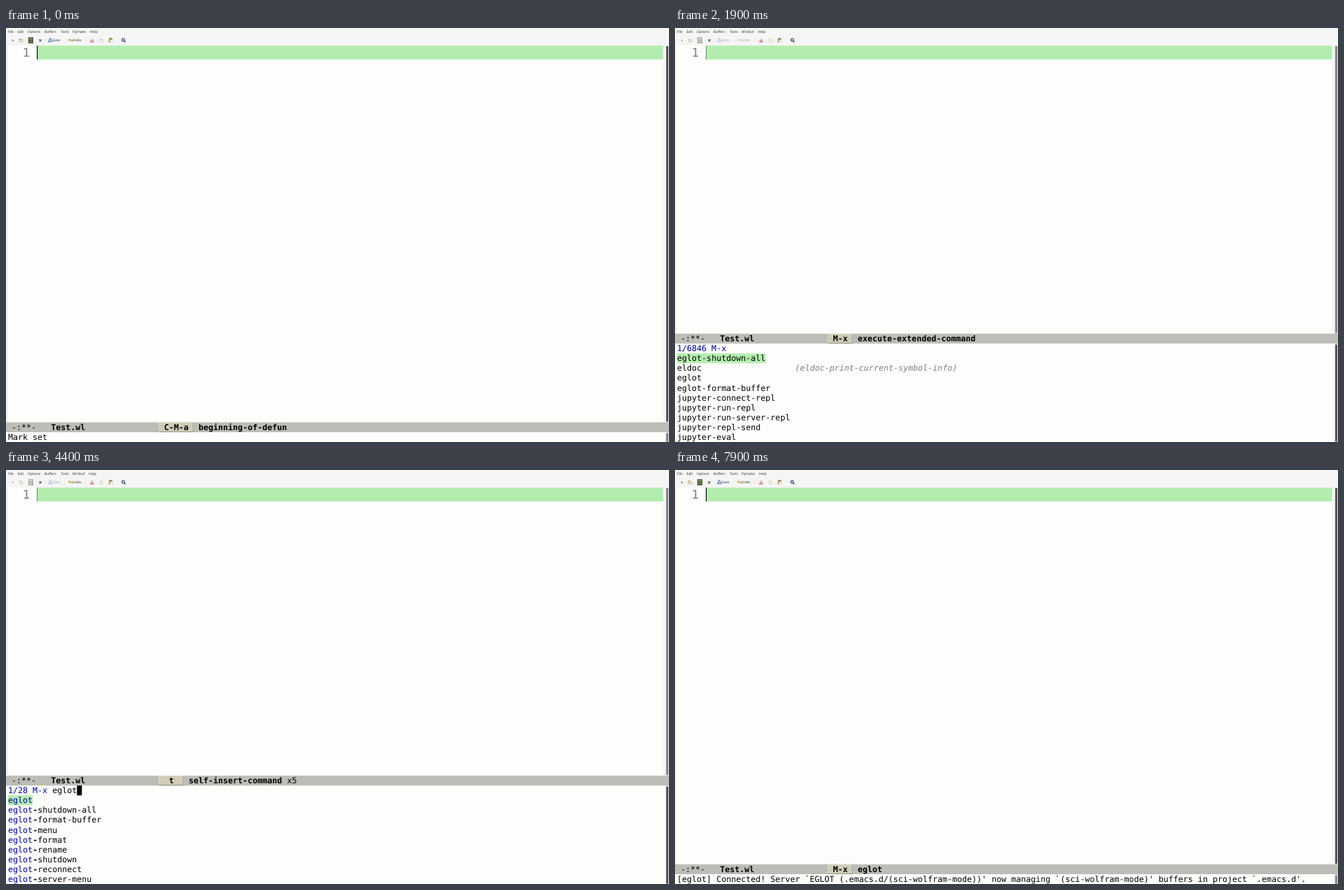
Animation, 947 px wide and 592 px high, one loop 8000 ms. Source, as an HTML page with a canvas:

```html
<!DOCTYPE html>
<html lang="en">
<head>
<meta charset="utf-8">
<title>Editor session</title>
<style>
html, body { margin: 0; width: 100%; height: 100%; overflow: hidden; background: #fdfdfc; }
canvas { display: block; width: 947px; height: 592px; }
</style>
</head>
<body>
<canvas id="stage" width="947" height="592"></canvas>
<script>
const ctx = document.getElementById('stage').getContext('2d');
const W = 947, H = 592, LOOP = 8000;
const SIZE = 11.67, CW = 7.025, ROW = 14.08, LEFT = 3;
const MONO = '"DejaVu Sans Mono", monospace';
const SANS = '"Noto Sans", "Open Sans", sans-serif';
const BLUE = '#0000a8', GREEN = '#b3edae', PAPER = '#fdfdfc', CHROME = '#f6f5f6';

// Moments in ms
const PROMPT = 900, LIST = 1800, CARET = 2000, DONE = 4600, CONNECTED = 7500;
const KEYS = [[2500, 'e'], [2800, 'g'], [3100, 'l'], [3300, 'o'], [3600, 't']];

const START = ['eglot-shutdown-all', 'eldoc', 'eglot', 'eglot-format-buffer',
  'jupyter-connect-repl', 'jupyter-run-repl', 'jupyter-run-server-repl',
  'jupyter-repl-send', 'jupyter-eval'];
const WITH_E = ['eglot-shutdown-all', 'eldoc', 'eglot', 'eglot-format-buffer',
  'ert', 'ediff', 'eshell', 'elint-file', 'eww'];
const EGLOT = ['eglot-shutdown-all', 'eglot', 'eglot-format-buffer', 'eglot-menu',
  'eglot-format', 'eglot-rename', 'eglot-shutdown', 'eglot-reconnect', 'eglot-server-menu'];
const EXACT = ['eglot', ...EGLOT.filter(name => name !== 'eglot')];

const SERVER = "`EGLOT (.emacs.d/(sci-wolfram-mode))'";
const WAITING = '[eglot] Waiting in background for server ' + SERVER;
const READY = '[eglot] Connected! Server ' + SERVER +
  " now managing `(sci-wolfram-mode)' buffers in project `.emacs.d'.";

function rect(x, y, w, h, color) {
  ctx.fillStyle = color;
  ctx.fillRect(x, y, w, h);
}

function line(points, color, width = 1) {
  ctx.strokeStyle = color;
  ctx.lineWidth = width;
  ctx.beginPath();
  points.forEach(([x, y]) => ctx.lineTo(x, y));
  ctx.stroke();
}

function ring(x, y, r, color, width = 0.9) {
  ctx.strokeStyle = color;
  ctx.lineWidth = width;
  ctx.beginPath();
  ctx.arc(x, y, r, 0, Math.PI * 2);
  ctx.stroke();
}

function text(str, x, y, color = '#000', style = '', size = SIZE, family = MONO) {
  ctx.font = `${style} ${size}px ${family}`;
  ctx.fillStyle = color;
  ctx.fillText(str, x, y);
}

const label = (str, x, y, color = '#333') => text(str, x, y, color, '', 4.9, SANS);

function mix(a, b, k) {
  const v = Math.round(a + (b - a) * Math.min(1, Math.max(0, k)));
  return `rgb(${v},${v},${v + 4})`;
}

function drawMenu(inPrompt) {
  rect(0, 0, W, 25, CHROME);
  const items = [['File', 3], ['Edit', 16.5], ['Options', 31], ['Buffers', 55], ['Tools', 78]];
  items.push(...(inPrompt ? [['Minibuf', 95], ['Help', 118.3]] : [['Flymake', 95], ['Help', 120]]));
  items.forEach(([name, x]) => label(name, x, 6.8));
}

function drawTools(off, undoOff) {
  // New file and open folder
  ctx.globalAlpha = off ? 0.45 : 1;
  rect(7, 15, 5, 5.5, '#fbfbfb');
  rect(8.2, 17, 3, 1.6, '#8d9a8d');
  rect(9, 16.2, 1.3, 3.2, '#8d9a8d');
  rect(18.5, 15, 3, 1.5, '#b9aa8c');
  rect(18.5, 16, 6, 4.5, '#cbbd9f');
  rect(19.3, 17.2, 5, 2.4, '#e8dfcd');
  ctx.globalAlpha = 1;

  // Cabinet
  rect(31.8, 13.2, 7.2, 8.8, off ? '#a5a5a2' : '#45502f');
  rect(32.8, 14.2, 5.2, 2.8, off ? '#cfcfcb' : '#748a52');
  rect(32.8, 18, 5.2, 3, off ? '#c4c4c0' : '#67794a');

  line([[47.4, 16], [50.6, 19.5]], '#4a4a4a', 1.1);
  line([[50.6, 16], [47.4, 19.5]], '#4a4a4a', 1.1);

  // Save
  ctx.globalAlpha = off ? 0.4 : 1;
  line([[61, 18], [63.3, 14.7], [65.5, 18]], '#3f75b8', 1.1);
  rect(60, 18.4, 6.6, 1.8, '#6a8db8');
  label('Save', 66.6, 19.4);

  // Undo
  ctx.globalAlpha = undoOff ? 0.4 : 1;
  line([[91.3, 15.2], [89.3, 17.1], [91.3, 19]], '#c99a1c', 1);
  line([[89.5, 17.1], [93.6, 17.1], [94.4, 19.6]], '#c99a1c', 1.2);
  label('Undo', 94.8, 19.4);
  ctx.globalAlpha = 1;

  [56.5, 84.5, 113].forEach(x => rect(x, 13.5, 0.5, 8, '#e6e4e2'));

  // Cut
  line([[121.3, 14.8], [124, 18.8]], '#aaa', 0.8);
  line([[124.7, 14.8], [122, 18.8]], '#aaa', 0.8);
  ring(121.6, 19.4, 1.1, '#c8504c');
  ring(124.4, 19.4, 1.1, '#c8504c');

  // Copy and paste
  rect(133.6, 14.8, 4, 4.6, '#e5e0d4');
  rect(135, 16.2, 4, 4.6, '#ddd8c8');
  rect(135.6, 16.8, 2.8, 3.4, '#f3f0e8');
  rect(146.8, 14.8, 5.4, 6, '#b08f4e');
  rect(148.2, 14.2, 2.6, 1.4, '#77705f');
  rect(148.4, 16.6, 4.2, 4.4, '#ece9df');

  // Search
  ring(167.4, 17, 1.9, '#36466f', 1.2);
  line([[168.8, 18.4], [170.7, 20.3]], '#36466f', 1.4);
}

function drawWindow(bottom, inPrompt, barColor) {
  rect(0, 25, W, bottom - 25, PAPER);
  rect(0, 25, 2.7, bottom - 25, '#f2f2f1');
  rect(938.7, 25, 3, bottom - 25, '#f5f5f5');
  rect(941.7, 25, W - 941.7, bottom - 25, '#e6e4ea');
  rect(943, 26, 3, bottom - 27, barColor);
  rect(44.2, 25.2, 894.5, 19.8, GREEN);
  text('1', 23.7, 41, '#7b7b7b', '', 17.1);
  rect(44, 25.2, inPrompt ? 0.7 : 1.1, 19.8, inPrompt ? '#555' : '#000');
}

function drawModeLine(top, key, command, count) {
  const base = top + 11, col = n => 1 + n * CW;
  rect(0, top, W, ROW, '#bcbdb6');
  rect(0, top, W, 0.6, '#c9cac4');
  text('-:**-', col(1), base);
  text('Test.wl', col(9), base, '#000', 'bold');

  const cells = Math.max(5, key.length + 2);
  const x = col(31) - 0.5, w = cells * CW;
  rect(x, top, w, ROW, '#cfccb7');
  rect(x, top, w, 0.7, '#e2dfcc');
  rect(x, top, 0.7, ROW, '#e2dfcc');
  rect(x, top + ROW - 0.9, w, 0.9, '#8f8d7e');
  rect(x + w - 0.7, top, 0.7, ROW, '#a09e8e');
  text(key, col(31 + (cells - key.length) / 2), base, '#000', 'bold');
  text(command, col(32 + cells), base, '#000', 'bold');
  if (count > 1) text('x' + count, col(33 + cells + command.length), base);
}

function drawCandidate(name, typed, top, selected) {
  const base = top + 11, n = typed.length;
  if (selected) rect(LEFT, top, name.length * CW, ROW, GREEN);
  text(name.slice(0, n), LEFT, base, BLUE);
  text(name.slice(n, n + 1), LEFT + n * CW, base, '#000', n ? 'bold' : '');
  text(name.slice(n + 1), LEFT + (n + 1) * CW, base);
  if (name === 'eldoc') {
    text('(eldoc-print-current-symbol-info)', LEFT + 24 * CW, base, '#7f7f7f', 'italic');
  }
}

function drawList(top, typed, showCaret) {
  const n = typed.length;
  const total = n === 0 ? 6846 : n === 1 ? 312 : 28;
  const names = [START, WITH_E, EGLOT, EGLOT, EGLOT, EXACT][n];
  const prompt = `1/${total} M-x `;
  text(prompt, LEFT, top + 11, BLUE);
  text(typed, LEFT + prompt.length * CW, top + 11);
  if (showCaret) rect(LEFT + (prompt.length + n) * CW, top, CW, ROW, '#000');
  names.forEach((name, i) => drawCandidate(name, typed, top + (i + 1) * ROW, i === 0));
}

function draw(t) {
  const inPrompt = t >= PROMPT && t < DONE;
  const listing = t >= LIST && t < DONE;
  const typed = KEYS.filter(([at]) => t >= at).map(([, key]) => key).join('');
  const echoTop = H - ROW * (listing ? 10 : 1);
  const modeTop = echoTop - ROW;

  // Scroll bars swap emphasis when the focus moves
  const fade = t < DONE ? (t - LIST + 50) / 100 : 1 - (t - DONE) / 350;

  drawMenu(inPrompt);
  drawTools(listing, listing && !typed);
  drawWindow(modeTop, inPrompt, mix(84, 132, fade));

  rect(0, echoTop, W, H - echoTop, PAPER);
  rect(941.7, echoTop, W - 941.7, H - echoTop, '#e6e4ea');
  rect(943, echoTop + 1.5, 3, H - echoTop - 2, mix(132, 84, fade));

  if (t < LIST) drawModeLine(modeTop, 'C-M-a', 'beginning-of-defun');
  else if (t >= DONE) drawModeLine(modeTop, 'M-x', 'eglot');
  else if (typed) drawModeLine(modeTop, typed.slice(-1), 'self-insert-command', typed.length);
  else drawModeLine(modeTop, 'M-x', 'execute-extended-command');

  if (listing) {
    drawList(echoTop, typed, t >= CARET);
  } else if (inPrompt) {
    text('M-x ', LEFT, echoTop + 11, BLUE);
    rect(LEFT + 4 * CW, echoTop, CW, ROW, '#000');
  } else {
    text(t < PROMPT ? 'Mark set' : t < CONNECTED ? WAITING : READY, LEFT, echoTop + 11);
  }
}

ctx.textRendering = 'geometricPrecision';
const start = performance.now();

function tick() {
  const t = (performance.now() - start) % LOOP;
  draw(Math.floor(t / 100) * 100);
  requestAnimationFrame(tick);
}
tick();
</script>
</body>
</html>
```
